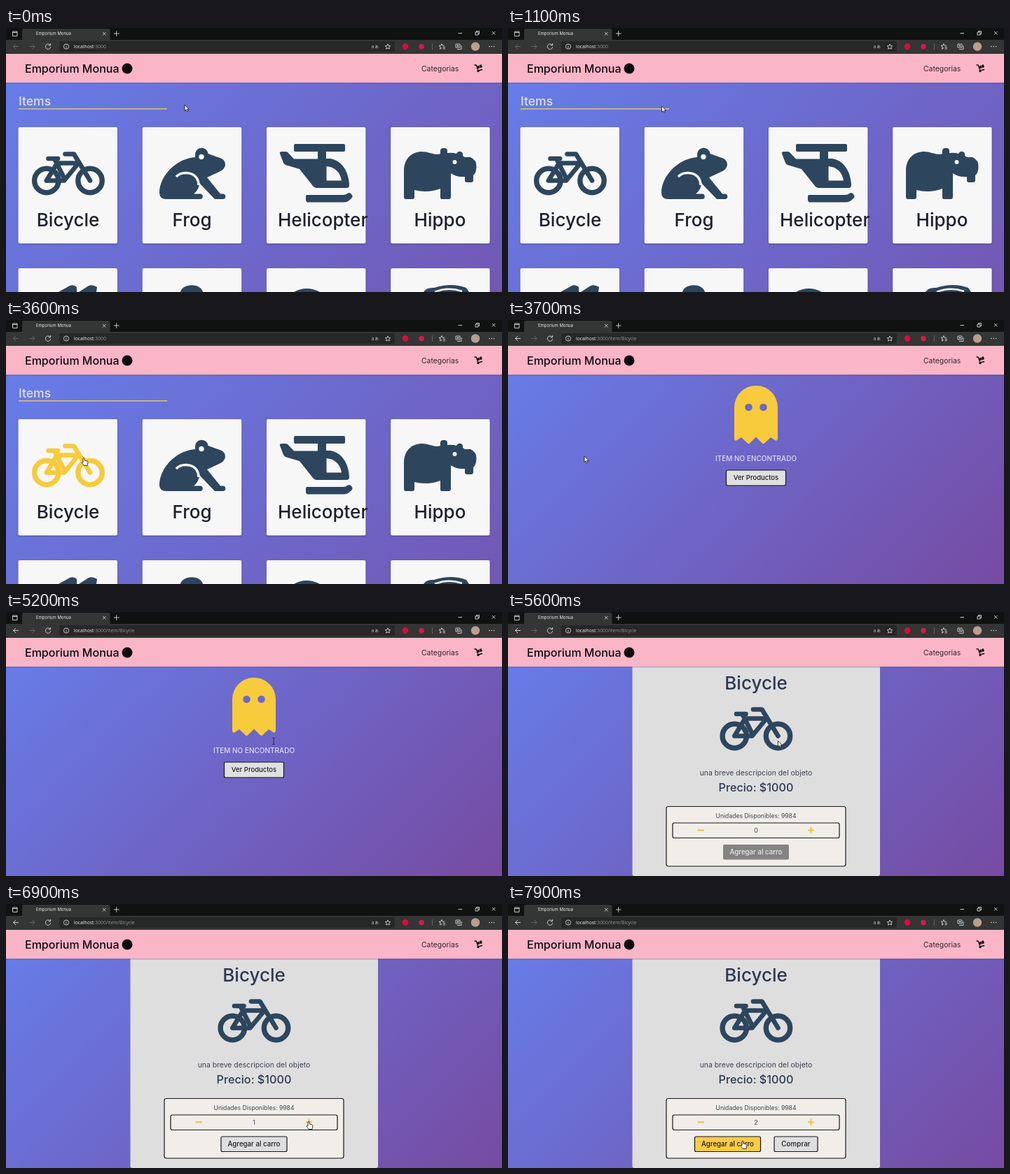
Animation, 708 px wide and 378 px high, one loop 8000 ms. Source, as an HTML page:

```html
<!DOCTYPE html>
<html lang="es">
<head>
<meta charset="utf-8">
<title>Emporium Monua</title>
<style>
html, body { margin: 0; width: 100%; height: 100%; overflow: hidden; background: #667eea; }
svg { display: block; width: 708px; height: 378px; font-family: Inter, "Open Sans", sans-serif; }
text { white-space: pre; }
.mid { text-anchor: middle; }
.med { font-weight: 500; }
.ui { font-family: "Open Sans", "Noto Sans", sans-serif; }
.line { fill: none; stroke: #d6d6d6; stroke-width: .9; }
.icon { fill: #2d465e; }
.cut { fill: #f7f7f7; }
.card { fill: #f7f7f7; filter: drop-shadow(0 1px 1px #0005); }
.btn { stroke: #15171f; stroke-width: 1.2; }
.wheel { fill: none; stroke-width: 7.4; }
.frame { fill: none; stroke-width: 6.6; stroke-linecap: round; stroke-linejoin: round; }
</style>
</head>
<body>
<svg viewBox="0 0 708 378" xmlns="http://www.w3.org/2000/svg">
<defs>
  <linearGradient id="tall" gradientUnits="userSpaceOnUse" x1="2" y1="35" x2="706" y2="739">
    <stop stop-color="#667eea"/><stop offset="1" stop-color="#764ba2"/>
  </linearGradient>
  <linearGradient id="short" gradientUnits="userSpaceOnUse" x1="92" y1="-54" x2="616" y2="470">
    <stop stop-color="#667eea"/><stop offset="1" stop-color="#764ba2"/>
  </linearGradient>
  <linearGradient id="face" x2="1" y2="1">
    <stop stop-color="#a9a49a"/><stop offset="1" stop-color="#c99a82"/>
  </linearGradient>
  <g id="bike">
    <circle class="wheel" cx="57.8" cy="218.5" r="17.2"/>
    <circle class="wheel" cx="120" cy="218.5" r="17.2"/>
    <path class="frame" d="M60.5 187H74M84.500 180.500H97L120 218.500M57.800 218.500L73 193.500H103.500L83 218.500H57.800M69.500 188L84 217"/>
  </g>
</defs>

<!-- shop list -->
<g id="list">
  <rect y="37" width="708" height="341" fill="url(#tall)"/>
  <text x="18" y="111" font-size="17.500" fill="#dfe0ec" class="med">Items</text>
  <path d="M18 115.700H230" stroke="#dcc573" stroke-width="1.500"/>
  <g id="cards"></g>
  <use id="listBike" href="#bike" stroke="#2d465e"/>
  <g class="icon">
    <path d="M270 181C271 169 287 169 288.500 180L308 187Q313 190 313 196Q312 203 304 206L287 214L306 237.500H309.500A3.700 3.700 0 0 1 309.500 245H298L276 222Q276 231 268 237.500H277A3.700 3.700 0 0 1 277 245H229Q219 245 219 236C219 212 243 187 270 185Z"/>
    <path d="M243 213C250 205 266 206 272 214.500Q275 219 275 225" fill="none" stroke="#f7f7f7" stroke-width="3.500"/>
    <circle class="cut" cx="279" cy="184.500" r="3.700"/>
    <path d="M413 166H482Q484 166 484 168V175Q484 177 482 177H457V187H463C480 190 489 206 490 225Q490 229 486 229H443Q440 229 438 226L419 202L399 196Q397 195 396 193L391 180Q390 177 394 177H399Q402 177 403 179L411 187.500H445V177H413Q411 177 411 175V168Q411 166 413 166Z"/>
    <path class="cut" d="M457.500 198V218.500H479C477 206 469 199 457.500 198Z"/>
    <path d="M430 239H481Q485 239 488 236.500Q491 235 493 238Q496 241 493 244Q488 249.500 482 249.500H430Q428 249 428 246V241Q428 239 430 239Z"/>
    <path d="M568 242V205C568 186 580 177 594 177C604 177 612 183 620 180V176Q620 172 624 172H626Q630 172 630 176V179Q638 178 643 180Q645 176 649 177Q653 178 652 183L655 185H663Q672 189 671.500 199Q671 208 667 211V219Q666 221 664 221H658Q655 221 655 218V213H651Q642 213 635 208V242Q635 245 632 245H622Q620 245 620 242V230Q602 237 583 232V242Q583 245 580 245H571Q568 245 568 242Z"/>
    <circle class="cut" cx="640.500" cy="192" r="3"/>
    <path d="M75 378L91 369Q97 367 101 371V378ZM104 378L118 369Q124 367 130 371L129 378ZM249 378C252 365 278 365 281 378ZM411 378Q429 368 448 378ZM596 378Q600 371 611 372Q636 364 657 372L661 378Z"/>
    <path d="M612 378Q631 370 651 377" fill="none" stroke="#f7f7f7" stroke-width="2.500"/>
  </g>
  <g font-size="26" fill="#1c1f2d" class="med">
    <text class="mid" x="88.500" y="284">Bicycle</text>
    <text class="mid" x="265.500" y="284">Frog</text>
    <text x="388" y="284">Helicopter</text>
    <text class="mid" x="619.500" y="284">Hippo</text>
  </g>
</g>

<!-- not found -->
<g id="missing">
  <rect y="37" width="708" height="341" fill="url(#short)"/>
  <path fill="#f7cb3b" fill-rule="evenodd" d="M323 125A31 31 0 0 1 385 125V170Q384 174 381 172L375 168L366 176.500Q364.500 178 363 176.500L354 167.500L345 176.500Q343.500 178 342 176.500L333 168L327 172Q323 174 323 170ZM338.200 125a5.300 5.300 0 1 0 10.600 0a5.300 5.300 0 1 0 -10.600 0M359.200 125a5.300 5.300 0 1 0 10.600 0a5.300 5.300 0 1 0 -10.600 0"/>
  <text class="mid med" x="354" y="202" font-size="10" fill="#dddcec">ITEM NO ENCONTRADO</text>
  <rect class="btn" x="311.500" y="215" width="85" height="22" rx="2" fill="#e0e0e0"/>
  <text class="mid med" x="354" y="229.300" font-size="9.500" fill="#1b1c24">Ver Productos</text>
</g>

<!-- product -->
<g id="product">
  <rect y="37" width="708" height="341" fill="url(#short)"/>
  <rect x="177.500" y="60" width="353.500" height="318" rx="3" fill="#dedede"/>
  <text class="mid med" x="354" y="111" font-size="26" fill="#2b3a52">Bicycle</text>
  <use href="#bike" x="265.500" y="-41" stroke="#2d465e"/>
  <text class="mid" x="354" y="234" font-size="10.400" fill="#3a4354">una breve descripcion del objeto</text>
  <text class="mid med" x="354" y="257" font-size="16.200" fill="#2b3a52">Precio: $1000</text>
  <rect class="btn" x="226" y="278.500" width="256" height="85.500" rx="3" fill="#f1ede8"/>
  <text class="mid" x="354" y="295" font-size="8.650" fill="#3a4354">Unidades Disponibles: 9984</text>
  <rect class="btn" x="235" y="302" width="238" height="21.500" rx="2.500" fill="#f1ede8"/>
  <path d="M270.500 312.300H280M428 312.300H437M432.500 307.800V316.800" stroke="#f3c545" stroke-width="2.200"/>
  <text id="count" class="mid" x="354" y="315.700" font-size="9" fill="#3a4354">0</text>
  <g id="add">
    <rect class="btn" x="307" y="333" width="94" height="21.500" rx="2"/>
    <text class="mid med" x="354" y="347.200" font-size="9.700">Agregar al carro</text>
  </g>
  <g id="buy">
    <rect class="btn" x="380" y="333" width="62" height="21.500" rx="2" fill="#dedede"/>
    <text class="mid med" x="411" y="347.200" font-size="9.900" fill="#1b1c24">Comprar</text>
  </g>
</g>

<!-- site header -->
<rect y="78" width="708" height="1.500" fill="#26204a" opacity=".3"/>
<rect y="37" width="708" height="41.300" fill="#fab5c7"/>
<text x="27" y="63.700" font-size="16" class="med" fill="#0d0b0d">Emporium Monua</text>
<circle cx="173" cy="58" r="7.500" fill="#0d0b0d"/>
<text x="593" y="61.500" font-size="10.400" fill="#332a30">Categorias</text>
<g stroke="#120c10" fill="#120c10">
  <path d="M668.500 53H671L674 61L680 59.500" fill="none" stroke-width="1.300"/>
  <path d="M672.500 55L675 54L676 57L673.500 58ZM676 53.500L678.500 52.500L679.500 56L677 57Z" stroke-width=".6"/>
  <circle cx="674" cy="61.500" r="1.300"/>
</g>

<!-- browser -->
<rect width="708" height="18" fill="#101212"/>
<rect y="17" width="708" height="20" fill="#343535"/>
<path d="M23 17V3Q23 1 25 1H146Q148.500 1 148.500 3V17Z" fill="#343535"/>
<rect x="76" y="19" width="479" height="15" rx="2.500" fill="#262727"/>
<g class="line">
  <path d="M9.500 5H16V11.500H9.500ZM9.500 6.500H16M138 6L142.500 10.500M142.500 6L138 10.500M154 8H161.500M157.700 4.300V11.800"/>
  <path d="M645.500 7.500H651M670 6H674V10H670ZM671.500 6V4.500H675.500V8.500H674M694 5L698.500 9.500M698.500 5L694 9.500"/>
  <path id="back" d="M18 26.500H10.500M14 23L10.500 26.500L14 30"/>
  <path stroke="#696a6a" d="M33.500 26.500H41M37.500 23L41 26.500L37.500 30"/>
  <path d="M63 24.500A3.700 3.700 0 1 0 63.700 27M63.500 22V24.800H60.700"/>
  <circle cx="86" cy="26.500" r="3.600"/><path d="M86 26V28.500M86 24.300V25"/>
  <path d="M545 23L546.100 25.400L548.700 25.700L546.800 27.500L547.300 30L545 28.800L542.700 30L543.200 27.500L541.300 25.700L543.900 25.400ZM622 22.500L623.100 25.200H626M622 22.500L620.800 25.200H618L620.200 27L619.500 30L622 28.500M623.500 27.500H627M623.500 29.700H627"/>
  <path d="M642 23H648V28H642ZM644 30.500H650V25M645 24V27M643.500 25.500H646.500"/>
  <path d="M608.500 22V31" stroke="#666"/>
</g>
<g class="ui">
  <text x="521.500" y="29" font-size="7" fill="#bbb">aぁ</text>
  <text x="43" y="10.300" font-size="6" fill="#e8e8e8" font-family="Inter, sans-serif">Emporium Monua</text>
  <text x="97" y="29" font-size="6.800" fill="#f0f0f0">localhost<tspan id="path" fill="#969898">:3000</tspan></text>
</g>
<circle cx="570" cy="26.500" r="4.400" fill="#d90d3c"/>
<circle cx="593" cy="26.500" r="3.800" fill="#d31b4c"/>
<circle cx="670" cy="26.500" r="6.200" fill="url(#face)"/>
<g fill="#d6d6d6"><circle cx="690" cy="26.500" r=".8"/><circle cx="693.300" cy="26.500" r=".8"/><circle cx="696.600" cy="26.500" r=".8"/></g>

<!-- pointer -->
<g id="pointer" stroke="#111" stroke-width=".8" fill="#fff">
  <path id="arrow" d="M0 0V8.500L2 6.800L3.300 9.700L4.800 9L3.500 6.300H6.100Z"/>
  <path id="hand" d="M-1 1Q0 -.7 1 1V4L5 5Q6 5.500 5.800 7.500L5 11.500H.3L-2.700 7.500Q-3 6 -1 6.700Z"/>
  <path id="beam" d="M-1.800 -4.500H1.800M0 -4.500V4.500M-1.800 4.500H1.800" stroke="#222"/>
</g>
</svg>
<script>
const LOOP = 8000, STEP = 100;
const OPEN = 3700, LOADED = 5600, ADDED = 7700;
const $ = id => document.getElementById(id);
const show = (id, on) => $(id).setAttribute('display', on ? 'inline' : 'none');
const set = (el, name, value) => el.setAttribute(name, value);

// time, x, y
const route = [
  [0, 255, 110], [400, 255, 110], [1900, 176, 114], [2100, 176, 114],
  [3100, 111, 197], [3600, 111, 197], [3700, 109, 195], [4100, 109, 195],
  [5000, 382, 185], [5500, 382, 185], [6000, 415, 181], [6200, 415, 181],
  [6700, 432, 311], [7100, 432, 311], [7500, 335, 339], [8000, 335, 339]
];

for (const y of [142, 344])
  for (let i = 0; i < 4; i++) {
    const r = document.createElementNS('http://www.w3.org/2000/svg', 'rect');
    const box = { x: 17.5 + 177.2 * i, y, width: 141.5, height: 166.5, rx: 2, class: 'card' };
    for (const k in box) set(r, k, box[k]);
    $('cards').append(r);
  }

function pointerAt(t) {
  const i = route.findIndex(p => p[0] > t);
  const [t0, x0, y0] = route[i - 1], [t1, x1, y1] = route[i];
  const u = (t - t0) / (t1 - t0), e = u * u * (3 - 2 * u);
  return [x0 + (x1 - x0) * e, y0 + (y1 - y0) * e];
}

const inside = (x, y, l, t, r, b) => x >= l && x <= r && y >= t && y <= b;

function drawAdd(count, added, hover) {
  const [box, label] = $('add').children;
  set($('add'), 'transform', `translate(${added ? -40.5 : 0} 0)`);
  set(box, 'fill', !count ? '#848484' : hover ? '#f9cc44' : '#dedede');
  set(box, 'stroke-opacity', count ? 1 : 0);
  set(label, 'fill', count ? '#1b1c24' : '#e8e8e8');
}

function draw(t) {
  const [x, y] = pointerAt(t);
  const list = t < OPEN, product = t >= LOADED, missing = !list && !product;
  const count = (t >= 6800) + (t >= 7000), added = t >= ADDED;
  const overBike = list && inside(x, y, 37, 172, 141, 245);
  const overAdd = product && inside(x, y, added ? 266 : 307, 333, added ? 361 : 401, 355);
  const overPlus = product && inside(x, y, 426, 306, 439, 319);
  const hand = overBike || overPlus || overAdd && count > 0;
  const beam = missing && inside(x, y, 290, 178, 418, 210);

  show('list', list);
  show('missing', missing);
  show('product', product);
  show('buy', added);
  set($('listBike'), 'stroke', overBike ? '#f7cb3b' : '#2d465e');
  set($('back'), 'stroke', list ? '#696a6a' : '#e0e0e0');
  $('path').textContent = list ? ':3000' : ':3000/item/Bicycle';
  $('count').textContent = count;
  drawAdd(count, added, overAdd);

  show('hand', hand);
  show('beam', beam);
  show('arrow', !hand && !beam);
  set($('pointer'), 'transform', `translate(${x} ${y})`);
}

const start = performance.now();
function tick() {
  const t = (performance.now() - start) % LOOP;
  draw(Math.floor(t / STEP) * STEP);
  requestAnimationFrame(tick);
}
tick();
</script>
</body>
</html>
```
